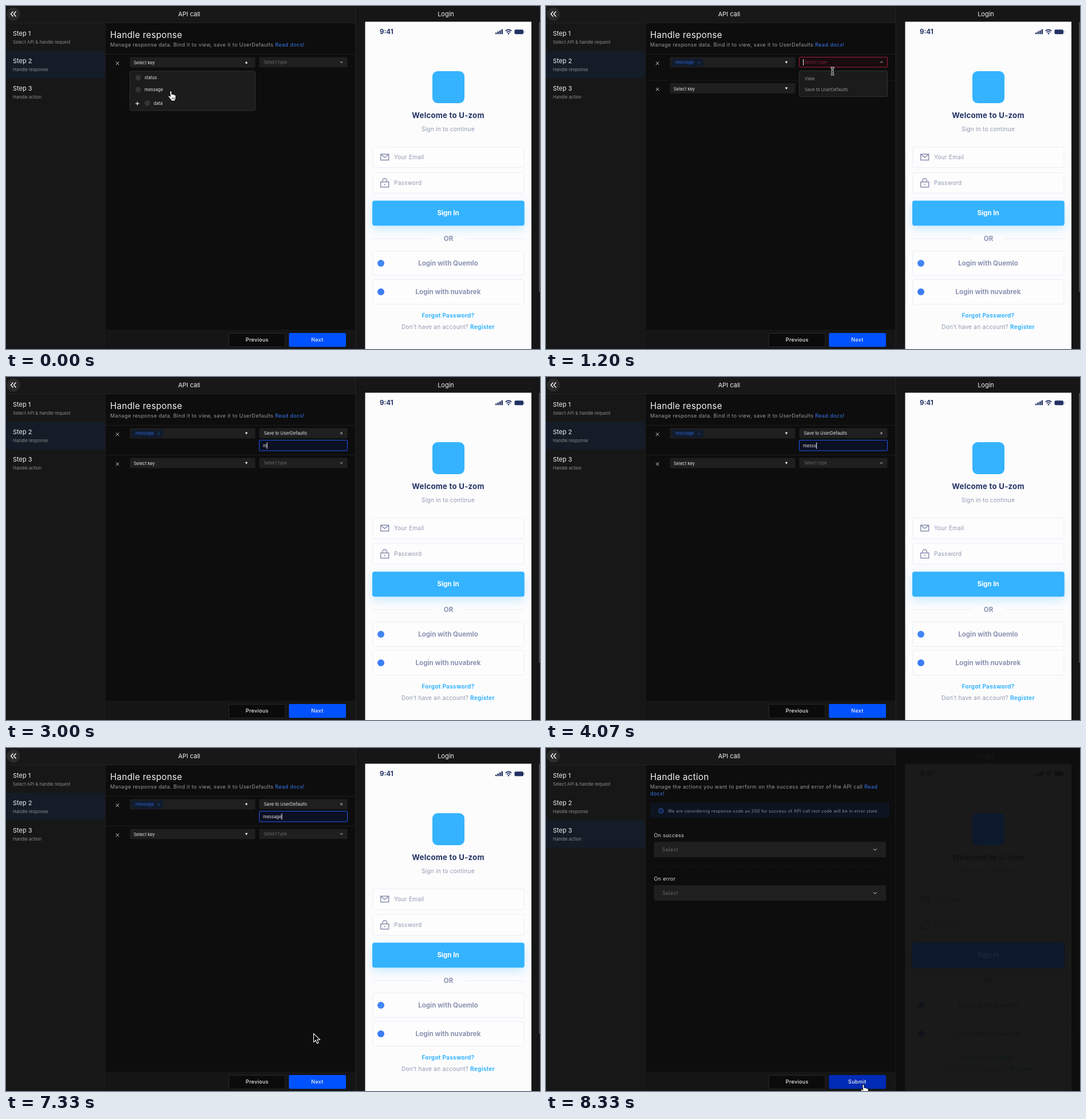
Recreate the animation shown at these times as an HTML page. Size 933 by 600 pixels, loop 8990 ms.

```html
<!DOCTYPE html>
<html lang="en">
<head>
<meta charset="utf-8">
<title>API call</title>
<style>
html, body { margin: 0; width: 100%; height: 100%; overflow: hidden; background: #0d0d0d; }
svg { display: block; width: 100%; height: 100%; font-family: Inter, sans-serif; }
text { white-space: pre; }
.mid { text-anchor: middle; }
.head { font-size: 11px; fill: #f0f0f0; }
.title { font-size: 15.2px; letter-spacing: .3px; fill: #f2f2f2; }
.lead { font-size: 9px; letter-spacing: .365px; fill: #9a9a9a; }
.small { font-size: 7.7px; fill: #8c8c8c; }
.item { font-size: 7.6px; fill: #e4e4e4; }
.button { font-size: 9px; font-weight: 500; letter-spacing: .3px; fill: #f0f0f0; }
.label { font-size: 9px; letter-spacing: .3px; fill: #e0e0e0; }
.note { font-size: 7.3px; letter-spacing: .38px; fill: #8a8f99; }
.soft { font-size: 10px; letter-spacing: .28px; fill: #9098b1; }
.bold { font-size: 11.5px; font-weight: 700; fill: #8b92b0; }
.welcome { font-size: 13.2px; letter-spacing: .25px; }
.link { fill: #3a78f2; }
.chip { fill: #2c62cf; }
.hint { fill: #666; }
.option { fill: #929292; }
.error { fill: #8e1c31; }
.navy { fill: #223263; }
.sky { fill: #35b3ff; }
.line { fill: none; stroke: #d8d8d8; }
.outline { fill: #fdfdfe; stroke: #e9edf6; }
</style>
</head>
<body>
<svg id="stage" viewBox="0 0 933 600"></svg>
<script>
const LOOP = 8990;
const stage = document.getElementById('stage');

const rect = (x, y, w, h, fill, extra = '') =>
  `<rect x="${x}" y="${y}" width="${w}" height="${h}" fill="${fill}" ${extra}/>`;
const text = (x, y, cls, content, id = '') =>
  `<text x="${x}" y="${y}" class="${cls}" ${id && `id="${id}"`}>${content}</text>`;
const path = (d, extra = 'class="line"') => `<path d="${d}" ${extra}/>`;
const circle = (x, y, r, fill) => `<circle cx="${x}" cy="${y}" r="${r}" fill="${fill}"/>`;
const group = (id, ...parts) => `<g id="${id}">${parts.join('')}</g>`;
const chevron = (x, y, size = 2.2, dir = 1) =>
  path(`M${x - size} ${y - dir * size / 2}l${size} ${dir * size} ${size} ${-dir * size}`);
const cross = (x, y, r, stroke = '#d8d8d8') =>
  path(`M${x - r} ${y - r}l${2 * r} ${2 * r}m0 ${-2 * r}l${-2 * r} ${2 * r}`, `stroke="${stroke}"`);
const triangle = (x, y, dir) =>
  path(`M${x - 2.3} ${y - dir * 2}h4.6l-2.3 ${dir * 4}z`, 'fill="#eee"');

const step = (n, caption) =>
  text(12, 3.5 + 48 * n, 'head', `Step ${n}`) + text(12, 18 + 48 * n, 'small', caption);

const keyBox = () => rect(216.5, 89.5, 219, 18, '#1f1f1f', 'rx="1.5"');
const typeBox = id => rect(442.5, 89.5, 154, 17.5, '#1f1f1f', `rx="1.5" ${id ? `id="${id}"` : ''}`);

const sidebar = () => [
  rect(0, 0, 611, 29, '#181818'), rect(0, 29, 173.5, 571, '#171717'),
  rect(0, 29, 611, 1, '#222'), rect(173, 30, 1, 570, '#1d1d1d'),
  circle(13, 14, 11.5, '#2b2b2b'),
  path('M12.5 9.5l-4 4.5 4 4.5m5 -9l-4 4.5 4 4.5', 'fill="none" stroke="#fff" stroke-width="1.4"'),
  text(320, 17.7, 'head mid', 'API call'),
  rect(0, 78.5, 173, 48, '#141c27', 'id="active"'),
  step(1, 'Select API &amp; handle request'),
  step(2, 'Handle response'),
  step(3, 'Handle action')
].join('');

const responsePage = () => group('response',
  text(182, 56, 'title', 'Handle response'),
  text(182, 71, 'lead', 'Manage response data. Bind it to view, save it to UserDefaults <tspan class="link">Read docs!</tspan>'),
  rect(174, 84, 436, 1, '#1e1e1e'),
  cross(194.7, 100.3, 2.8), keyBox(),
  group('keyEmpty', text(223, 102, 'item', 'Select key'), triangle(420, 98.5, -1)),
  group('keyChip',
    rect(219, 92, 56, 14, '#111b2d', 'rx="1.5"'),
    text(226, 101.3, 'item chip', 'message'), cross(267, 99, 1.2, '#28508f'),
    triangle(420, 98.7, 1)),
  typeBox('type'),
  group('typeEmpty', text(450.5, 101, 'item hint', 'Select type', 'typeHint')),
  group('typeDown', chevron(586, 98.3)),
  group('typeUp', chevron(586, 98.3, 2.2, -1), rect(449, 93, 1, 11, '#eee')),
  group('typeSaved', text(450.5, 101, 'item', 'Save to UserDefaults'), cross(586, 98.3, 1.8)),
  text(442.5, 119.8, 'item error', 'Please select type', 'typeError'),
  group('entry',
    rect(442.5, 110.5, 154, 18.5, '#1f1f1f', 'rx="1.5" id="entryBox"'),
    text(449, 122.8, 'item hint', 'Enter key', 'entryHint'),
    text(449, 122.8, 'item', '', 'typed'),
    rect(0, 114.5, 1, 11, '#fff', 'id="caret"')),
  text(442.5, 141.5, 'item error', 'Please enter key', 'entryError'),
  group('row',
    rect(174, 84, 436, 1, '#1e1e1e'),
    cross(194.7, 100.3, 2.8), keyBox(), typeBox(),
    text(223, 102, 'item', 'Select key'), triangle(420, 98.7, 1),
    text(450.5, 101, 'item hint', 'Select type'), chevron(586, 98.3)),
  group('keyMenu',
    rect(216.5, 114, 219, 69, '#1c1c1c', 'rx="2" stroke="#303030"'),
    circle(231, 125.5, 4.8, '#353535'), text(242, 128.3, 'item', 'status'),
    circle(231, 146.2, 4.8, '#353535'), text(242, 149, 'item', 'message'),
    path('M226.3 170.6h6.4m-3.2 -3.2v6.4', 'stroke="#eee" stroke-width="1.2"'),
    circle(247, 170, 4.8, '#353535'), text(258, 172.8, 'item', 'data')),
  group('typeMenu',
    rect(442.5, 113.5, 154, 45, '#1b1b1b', 'rx="2" stroke="#303030"'),
    text(452, 129.8, 'item option', 'View'),
    text(452, 148.7, 'item option', 'Save to UserDefaults')));

const actionSelect = (y, label) => [
  text(188.5, y, 'label', label),
  rect(188.5, y + 8, 405.5, 27, '#1f1f1f', 'rx="2"'),
  text(203, y + 25, 'label hint', 'Select'), chevron(575, y + 21.7, 3)
].join('');

const actionPage = () => group('action',
  text(182, 56, 'title', 'Handle action'),
  text(182, 71, 'lead', 'Manage the actions you want to perform on the success and error of the API call <tspan class="link">Read</tspan>'),
  text(182, 83, 'lead link', 'docs!'),
  rect(182, 96, 418, 26, '#0d1420', 'rx="2"'),
  path('M201 109.5v3m0 -5.2v1.1M205 110a4 4 0 1 0 -8 0a4 4 0 1 0 8 0', 'fill="none" stroke="#2f6de8" stroke-width=".9"'),
  text(213, 113.3, 'note', 'We are considering response code as 200 for success of API call rest code will be in error state.'),
  actionSelect(156, 'On success'),
  path('M188 207h406', 'stroke="#1a1a1a" stroke-dasharray="2 2"'),
  actionSelect(232, 'On error'));

const footer = () => [
  rect(174.5, 566, 436, 34, '#151515'),
  rect(389.5, 572.5, 98.5, 24, '#0b0b0b', 'rx="2" stroke="#2a2a2a"'),
  text(438.7, 587.3, 'button mid', 'Previous'),
  rect(494.3, 572, 99.7, 24.3, '#0052ff', 'rx="2" id="next"'),
  text(544, 587.3, 'button mid', 'Next', 'nextLabel')
].join('');

const box = (y, h) => rect(640.5, y + .5, 264.5, h, '', 'class="outline" rx="3"');

const phone = () => [
  rect(611, 0, 322, 600, '#161616'), rect(610.5, 0, 1, 600, '#262626'),
  rect(931.3, 28, 1.7, 472, '#555'),
  text(768.5, 17.5, 'head mid', 'Login'),
  rect(627.5, 27.5, 290.5, 573, '#fcfcfd'),
  text(653, 49, 'bold navy', '9:41'),
  [0, 1, 2, 3].map(i => rect(855 + 3.5 * i, 46.5 - 1.9 * i, 2.6, 2.7 + 1.9 * i, '#223263', 'rx=".6"')).join(''),
  path('M872.7 43.6q5.3 -4.2 10.6 0M874.8 46q3.2 -2.5 6.4 0', 'fill="none" stroke="#223263" stroke-width="1.7"'),
  circle(878, 48.2, 1.3, '#223263'),
  rect(888.5, 41.2, 15.5, 8, '#223263', 'rx="2"'), rect(904.7, 43.7, 1.2, 3, '#8890aa'),
  rect(745, 114, 56, 56, '#35b3ff', 'rx="9"'),
  text(772.5, 196.3, 'bold navy mid welcome', 'Welcome to U-zom'),
  text(772.5, 219, 'soft mid', 'Sign in to continue'),
  box(246, 36), box(291, 36),
  path('M654.7 259.3h14v10.2h-14zl7 5.7 7 -5.7', 'fill="none" stroke="#8990ae" stroke-width="1.5"'),
  path('M654.7 307.8h14v9h-14zM658 307.5v-2a3.7 3.7 0 0 1 7.4 0v2M661.7 311v2.4', 'fill="none" stroke="#8990ae" stroke-width="1.5"'),
  text(678, 268, 'soft', 'Your Email'), text(678, 313, 'soft', 'Password'),
  rect(640, 340.5, 265.8, 43.7, '#35b3ff', 'rx="4" style="filter:drop-shadow(0 6px 8px #35b3ff40)"'),
  text(772.5, 366.3, 'bold mid', '<tspan fill="#fff">Sign In</tspan>'),
  path('M640 407h103m59 0h103', 'stroke="#e7ebf5"'),
  text(773, 411, 'bold mid', 'OR'),
  box(428, 43), box(478, 43),
  circle(655, 450, 6, '#4285f4'), circle(655, 500, 6, '#3b7cf6'),
  text(772.5, 453.7, 'bold mid', 'Login with Quemlo'),
  text(772.5, 503.7, 'bold mid', 'Login with nuvabrek'),
  text(772.5, 545, 'soft sky mid', '<tspan font-weight="700">Forgot Password?</tspan>'),
  text(772.5, 565, 'soft mid', 'Don’t have an account? <tspan class="sky" font-weight="700">Register</tspan>'),
  group('dim',
    rect(611, 0, 322, 600, '#0e0e0e', 'opacity=".95"'),
    rect(745, 114, 56, 56, '#0c192d', 'rx="9"'),
    rect(640, 340.5, 265.8, 43.7, '#0c192d', 'rx="4"'),
    text(772.5, 366.3, 'bold mid', '<tspan fill="#1d2636">Sign In</tspan>'))
].join('');

// Each pointer is drawn around its hot spot.
const pointers = () => group('pointer',
  group('arrow', path('M0 0v15l3.5 -3.3 2.4 5.6 2.7 -1.2 -2.4 -5.4h4.8z', 'fill="#000" stroke="#fff" stroke-width="1.1"')),
  group('beam', ...['#fff 3', '#000 1.2'].map(pen => {
    const [color, width] = pen.split(' ');
    return path('M-3 -6q3 0 3 2v8q0 2 -3 2M3 -6q-3 0 -3 2v8q0 2 3 2M-2 1h4', `fill="none" stroke="${color}" stroke-width="${width}"`);
  })),
  group('hand', path('M-1.7 1.5q0 -1.8 1.5 -1.8t1.6 1.8v4q2 -1 2.5 .5 2 -.8 2.4 .8 2.2 -.6 2.4 1.5v3.7q0 2 -1.4 3.4v1.6h-6.6v-1.4l-4.6 -5.4q-1 -1.6 .2 -2.2 1.2 -.4 3 1.4z', 'fill="#fff" stroke="#000" stroke-width=".9"'),
    path('M2.3 11v3.4m2 -3.4v3.4m2 -3.4v3.4', 'stroke="#000" stroke-width=".7"')));

stage.innerHTML = rect(0, 0, 933, 600, '#0d0d0d') + sidebar() + responsePage() + actionPage() +
  footer() + phone() + pointers();

const ui = Object.fromEntries([...stage.querySelectorAll('[id]')].map(el => [el.id, el]));
const show = (id, visible) => { ui[id].style.display = visible ? '' : 'none'; };
const paint = (id, fill, stroke) => {
  ui[id].setAttribute('fill', fill);
  ui[id].setAttribute('stroke', stroke || 'none');
};

// time, x, y
const route = [
  [0, 288, 149], [200, 287, 147], [730, 500, 99], [930, 500, 100], [1200, 500.5, 114],
  [1730, 490, 144], [2000, 490, 143.5], [2600, 486, 121], [6800, 486, 121],
  [7530, 549, 584], [7670, 549, 584], [8130, 554.5, 589], [LOOP, 554.5, 589]
];
const shapes = [
  [0, 'hand'], [200, 'arrow'], [600, 'beam'], [1330, 'hand'], [1870, 'arrow'], [2330, 'beam'],
  [3000, 'none'], [6800, 'beam'], [6930, 'arrow'], [7400, 'hand']
];
const typing = [
  [0, ''], [3000, 'm'], [3270, 'me'], [3530, 'mes'], [3670, 'mess'], [4000, 'messs'], [4530, 'mess'],
  [4930, 'messa'], [5470, 'messaf'], [6070, 'messa'], [6400, 'messag'], [6530, 'message']
];
const at = (list, t) => list.findLast(([start]) => start <= t)[1];

function pointerAt(t) {
  const i = route.findIndex(([time]) => time > t);
  const [t0, x0, y0] = route[i - 1], [t1, x1, y1] = route[i];
  const p = (t - t0) / (t1 - t0), e = p * p * (3 - 2 * p);
  return [x0 + (x1 - x0) * e, y0 + (y1 - y0) * e];
}

function render(t) {
  const picked = t >= 200, menuOpen = t >= 930 && t < 1870, saved = t >= 1870;
  const focused = t >= 2600 && t < 8000, typed = at(typing, t), last = t >= 8330;

  show('response', !last);
  show('action', last);
  show('dim', last);
  ui.active.setAttribute('y', last ? 126.5 : 78.5);

  show('keyEmpty', !picked);
  show('keyMenu', !picked);
  show('keyChip', picked);
  show('row', picked);
  const rowOffset = !saved ? 45.5 : typed ? 52 : 67.5;
  ui.row.setAttribute('transform', `translate(0 ${rowOffset})`);

  show('typeEmpty', !saved);
  show('typeDown', !saved && !menuOpen);
  show('typeUp', menuOpen);
  show('typeMenu', menuOpen);
  show('typeSaved', saved);
  show('typeError', picked && !saved);
  ui.typeHint.style.fill = picked ? '#7b2435' : '';
  if (picked && !saved) paint('type', '#180c0f', '#a31d36');
  else if (saved && t < 2600) paint('type', '#0d111d', '#2145ac');
  else paint('type', '#1f1f1f');

  show('entry', saved);
  show('entryHint', !typed);
  show('entryError', saved && !typed);
  show('caret', focused);
  if (!typed) paint('entryBox', '#170c0e', '#84192d');
  else if (focused) paint('entryBox', '#0b1022', '#2455f0');
  else paint('entryBox', '#1f1f1f');
  ui.typed.textContent = typed;
  ui.caret.setAttribute('x', 449 + (typed && !last ? ui.typed.getComputedTextLength() : 0));

  paint('next', t >= 7400 ? '#002bb5' : '#0052ff');
  ui.nextLabel.textContent = last ? 'Submit' : 'Next';

  const shape = at(shapes, t);
  for (const name of ['arrow', 'beam', 'hand']) show(name, name === shape);
  ui.pointer.setAttribute('transform', `translate(${pointerAt(t)})`);
}

const start = performance.now();
function tick() {
  render((performance.now() - start) % LOOP);
  requestAnimationFrame(tick);
}
tick();
</script>
</body>
</html>
```
